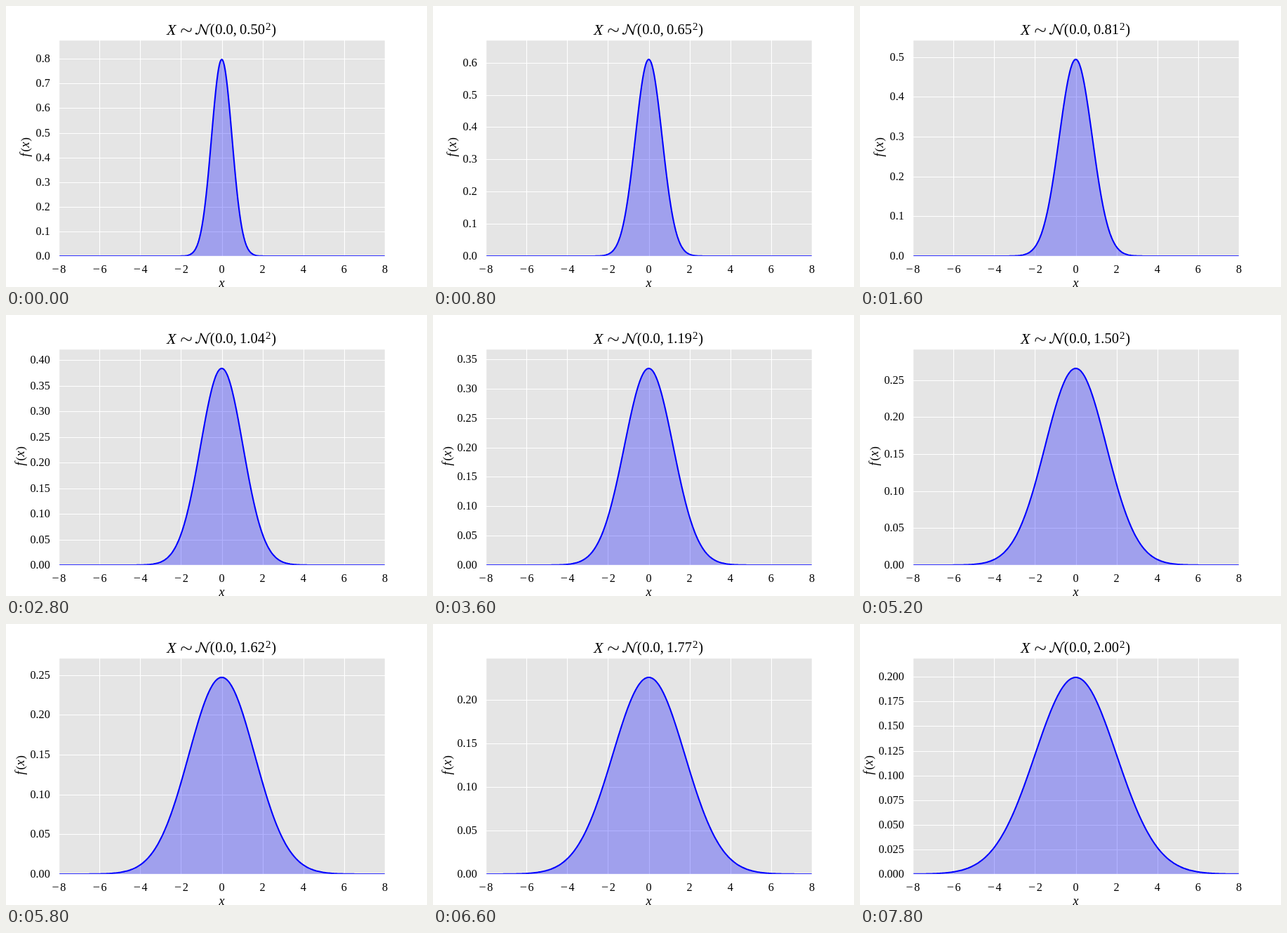
Write an HTML page that moves like this. It is 600 px wide and 400 px high and loops after 8 s.

```html
<!DOCTYPE html>
<html lang="en">
<head>
<meta charset="utf-8">
<title>Normal distribution, growing sigma</title>
<style>
  html, body { margin: 0; width: 100%; height: 100%; overflow: hidden; background: #fff; }
  svg { display: block; width: 600px; height: 400px; }
  text { font: 16.2px "Liberation Serif", "Noto Serif", serif; fill: #000; }
  .title text { font-size: 20.5px; }
  text.sup { font-size: 15px; }
  .title text.var { font-size: 22px; }
  .var { font-style: italic; }
  .label text { font-size: 17px; }
  .label text.var { font-size: 18px; }
  .end { text-anchor: end; }
  .mid { text-anchor: middle; }
  .grid { stroke: #fff; stroke-width: 1.11; }
  .math { fill: none; stroke: #000; stroke-linecap: round; stroke-linejoin: round; }
</style>
</head>
<body>
<svg viewBox="0 0 600 400">
  <clipPath id="plot"><rect x="75" y="48" width="465" height="308"/></clipPath>
  <rect x="75" y="48" width="465" height="308" fill="#e5e5e5"/>
  <g clip-path="url(#plot)">
    <g class="grid" id="xgrid"></g>
    <g class="grid" id="ygrid"></g>
    <path id="area" fill="#00f" fill-opacity=".3"/>
    <path id="curve" fill="none" stroke="#00f" stroke-width="2.08" stroke-linejoin="round"/>
  </g>
  <rect x="75.5" y="48.5" width="465" height="308" fill="none" stroke="#fff" stroke-width="1.39"/>
  <g id="xticks"></g>
  <g id="yticks"></g>
  <g class="title">
    <text class="var" x="229" y="40.5">X</text>
    <path class="math" stroke-width="1.2" d="M250 37.3c0-5.6 3.800-5.600 7-2.800s7 2.800 7-2.800"/>
    <path class="math" stroke-width="1.1" d="M271 39.300C275 42.500 276.300 35 277.600 26.500M285 40.500C286.500 33 287.200 25.700 291.600 25.700"/>
    <path d="M276.800 25.800h1.700l7 13.200-.3 1.900h-.9z"/>
    <circle cx="271.100" cy="39.200" r="1.200"/>
    <text x="290.800" y="40.300">(</text>
    <text x="298.200" y="40.300">0.0,</text>
    <text id="sigma" x="333" y="40.300"></text>
    <text class="sup" x="370" y="33.500">2</text>
    <text x="378.300" y="40.300">)</text>
  </g>
  <g class="label">
    <text class="var mid" x="307.500" y="399.500">x</text>
    <g id="ylabel">
      <text class="var" x="3">f</text>
      <text x="10">(</text>
      <text class="var" x="16">x</text>
      <text x="24.700">)</text>
    </g>
  </g>
</svg>
<script>
const FRAMES = 40, FRAME_MS = 200;
const LEFT = 75, WIDTH = 465, BASE = 356, HEIGHT = 308;
const $ = id => document.getElementById(id);
const snap = v => Math.floor(v + 0.5) + 0.5;
const toX = x => LEFT + (x + 8) / 16 * WIDTH;

function drawXAxis() {
  let lines = '', labels = '';
  for (let v = -8; v <= 8; v += 2) {
    const x = toX(v), digitX = v < 0 ? x + 6.3 : x;
    lines += `<path d="M${snap(x)} 48V356"/>`;
    labels += `<text class="mid" x="${digitX}" y="380.3">${Math.abs(v)}</text>`;
    if (v < 0) labels += `<text class="mid" x="${x - 4.4}" y="380.3" style="font-size:18px">−</text>`;
  }
  $('xgrid').innerHTML = lines;
  $('xticks').innerHTML = labels;
}

function draw(frame) {
  const sigma = 0.5 + 1.5 * frame / (FRAMES - 1);
  const peak = 1 / (sigma * Math.sqrt(2 * Math.PI));
  const top = 1.1 * peak;
  const toY = v => BASE - v / top * HEIGHT;

  // smallest round step that leaves at most nine intervals
  const step = [0.025, 0.05, 0.1].find(s => s >= top / 9);
  const decimals = step === 0.1 ? 1 : step === 0.05 ? 2 : 3;
  let lines = '', labels = '';
  for (let i = 0; i * step <= top; i++) {
    const y = toY(i * step);
    lines += `<path d="M75 ${snap(y)}H540"/>`;
    labels += `<text class="end" x="62.8" y="${Math.round(y) + 5.2}">${(i * step).toFixed(decimals)}</text>`;
  }
  $('ygrid').innerHTML = lines;
  $('yticks').innerHTML = labels;

  const points = [];
  for (let i = 0; i <= 400; i++) {
    const x = -8 + i * 0.04;
    const y = toY(peak * Math.exp(-x * x / (2 * sigma * sigma)));
    points.push(toX(x).toFixed(2) + ' ' + y.toFixed(2));
  }
  const path = 'M' + points.join('L');
  $('curve').setAttribute('d', path);
  $('area').setAttribute('d', path + `L540 ${BASE}H${LEFT}Z`);

  $('sigma').textContent = sigma.toFixed(2);
  $('ylabel').setAttribute('transform', `translate(${33.3 - 7.8 * (decimals - 1)} 217.5) rotate(-90)`);
}

let shown = -1;
function tick() {
  const frame = Math.floor(performance.now() / FRAME_MS) % FRAMES;
  if (frame !== shown) draw(shown = frame);
  requestAnimationFrame(tick);
}

drawXAxis();
tick();
</script>
</body>
</html>
```
